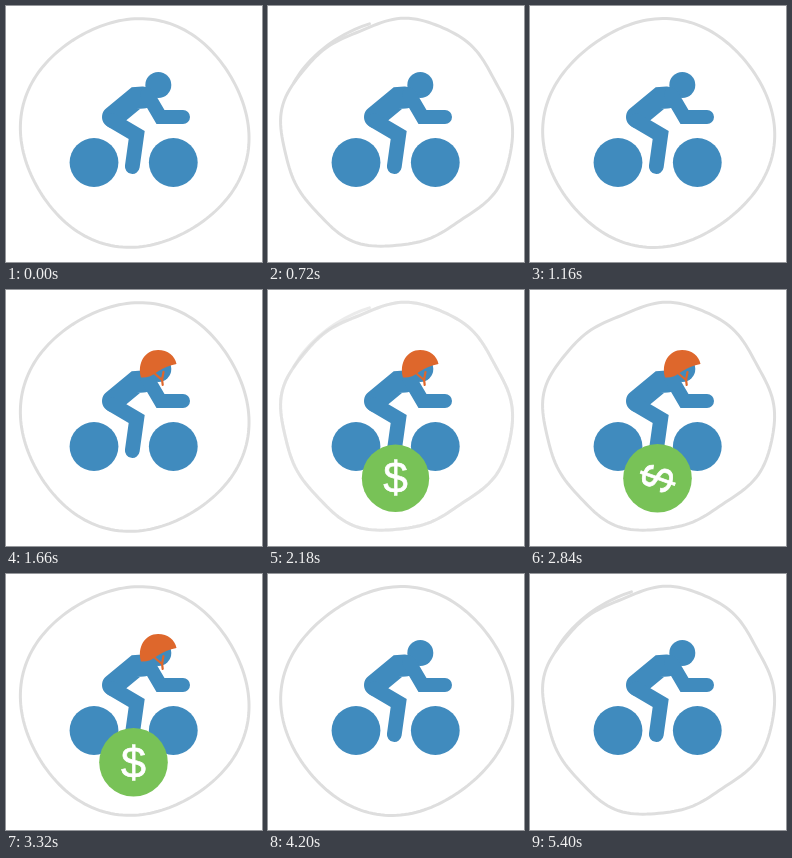
An HTML page with a canvas for the animation above (5420 ms loop, 256x256 px).

```html
<!DOCTYPE html>
<html lang="en">
<head>
<meta charset="utf-8">
<title>Cyclist</title>
<style>
html, body { margin: 0; width: 100%; height: 100%; overflow: hidden; background: #fff; }
canvas { display: block; width: 256px; height: 256px; }
</style>
</head>
<body>
<canvas id="stage"></canvas>
<script>
const LOOP = 5420, TICK = 20, HOLD = 200;
const BLUE = '#408bbe', ORANGE = '#de672c', GREEN = '#78c257', GREY = '#dedede';
const DEG = Math.PI / 180;

const canvas = document.getElementById('stage');
const ratio = window.devicePixelRatio || 1;
canvas.width = canvas.height = 256 * ratio;
const ctx = canvas.getContext('2d');

const clamp = x => Math.max(0, Math.min(1, x));
const span = (t, from, to) => clamp((t - from) / (to - from));
const easeOut = p => 1 - (1 - p) ** 2;
const easeInOut = p => p * p * (3 - 2 * p);

// Ring radii by angle: a circle with a few ripples
const ripple = (angle, count, size, peak) => size * Math.cos(count * (angle - peak) * DEG);
const round = a => 113.2 + ripple(a, 4, 1.8, 14);
const skewed = a => 113.5 + ripple(a, 4, 2, 8) + ripple(a, 2, 1.3, -25);
const bumpy = a => 113.2 + ripple(a, 4, 2.8, 16) + ripple(a, 2, 1.8, -25) + ripple(a, 9, 1, 32);
const rings = [round, skewed, bumpy, bumpy];

function traceRing(radius, from = 0, to = 360) {
  ctx.beginPath();
  for (let a = from; a <= to; a += 2) {
    ctx.lineTo(128.7 + radius(a) * Math.cos(a * DEG), 127 + radius(a) * Math.sin(a * DEG));
  }
  ctx.stroke();
}

function drawPose(pose, alpha) {
  ctx.globalAlpha = alpha;
  ctx.strokeStyle = GREY;
  ctx.lineWidth = 3;
  traceRing(rings[pose]);
  if (pose === 3) traceRing(round, 206, 256);
  ctx.globalAlpha = 1;
}

function drawRing(t) {
  const shifted = t + TICK;
  const pose = Math.floor(shifted / HOLD) % 4;
  const blending = shifted % HOLD < TICK;
  if (blending) drawPose((pose + 3) % 4, 0.6);
  drawPose(pose, blending ? 0.6 : 1);
}

function disc(x, y, r, color) {
  ctx.fillStyle = color;
  ctx.beginPath();
  ctx.arc(x, y, r, 0, Math.PI * 2);
  ctx.fill();
}

function limb(width, color, ...points) {
  ctx.strokeStyle = color;
  ctx.lineWidth = width;
  ctx.beginPath();
  points.forEach(p => ctx.lineTo(...p));
  ctx.stroke();
}

function drawCyclist() {
  disc(88, 156.5, 24.4, BLUE);
  disc(167.3, 156.5, 24.4, BLUE);
  disc(152.3, 79, 13, BLUE);
  limb(22, BLUE, [107, 111], [130, 92], [137, 91.5]);
  limb(14, BLUE, [141, 88], [154.5, 111], [177, 111]);
  limb(14.8, BLUE, [106, 114.5], [130.7, 129], [126.3, 160.5]);
}

function drawHelmet(t) {
  const shown = easeOut(span(t, 1160, 1680)) * (1 - easeInOut(span(t, 3600, 4020)));
  if (shown <= 0) return;
  ctx.save();
  ctx.globalAlpha = clamp(shown * 2);
  ctx.translate(0, -40 * (1 - shown));
  limb(2.2, ORANGE, [149, 84], [156, 90], [157.5, 82]);
  limb(2.2, ORANGE, [156, 89], [156.7, 95]);
  ctx.fillStyle = ORANGE;
  ctx.beginPath();
  ctx.moveTo(135, 87.5);
  ctx.bezierCurveTo(131, 73, 139, 60, 152, 60);
  ctx.bezierCurveTo(162, 60, 169, 66, 170.5, 74);
  ctx.quadraticCurveTo(160, 76, 151, 82);
  ctx.quadraticCurveTo(144, 88, 135, 87.5);
  ctx.fill();
  ctx.restore();
}

function drawCoin(t) {
  const scale = easeOut(span(t, 1660, 2260)) * (1 - easeInOut(span(t, 3380, 3760)));
  if (scale <= 0) return;
  ctx.save();
  ctx.translate(127.5, 188.3);
  ctx.scale(scale, scale);
  disc(0, 0, 34.3, GREEN);
  ctx.rotate(easeOut(span(t, 2260, 3300)) * Math.PI * 2);
  ctx.fillStyle = ctx.strokeStyle = '#fff';
  ctx.lineWidth = 0.7;
  ctx.font = '45px "Liberation Sans", Arial, sans-serif';
  ctx.textAlign = 'center';
  ctx.fillText('$', 0, 15.2);
  ctx.strokeText('$', 0, 15.2);
  ctx.restore();
}

function draw(now) {
  const t = Math.floor((now % LOOP) / TICK) * TICK;
  ctx.setTransform(ratio, 0, 0, ratio, 0, 0);
  ctx.fillStyle = '#fff';
  ctx.fillRect(0, 0, 256, 256);
  ctx.lineCap = 'round';
  ctx.lineJoin = 'miter';
  drawRing(t);
  drawCyclist();
  drawHelmet(t);
  drawCoin(t);
}

const start = performance.now();
function loop() {
  draw(performance.now() - start);
  requestAnimationFrame(loop);
}
loop();
</script>
</body>
</html>
```
